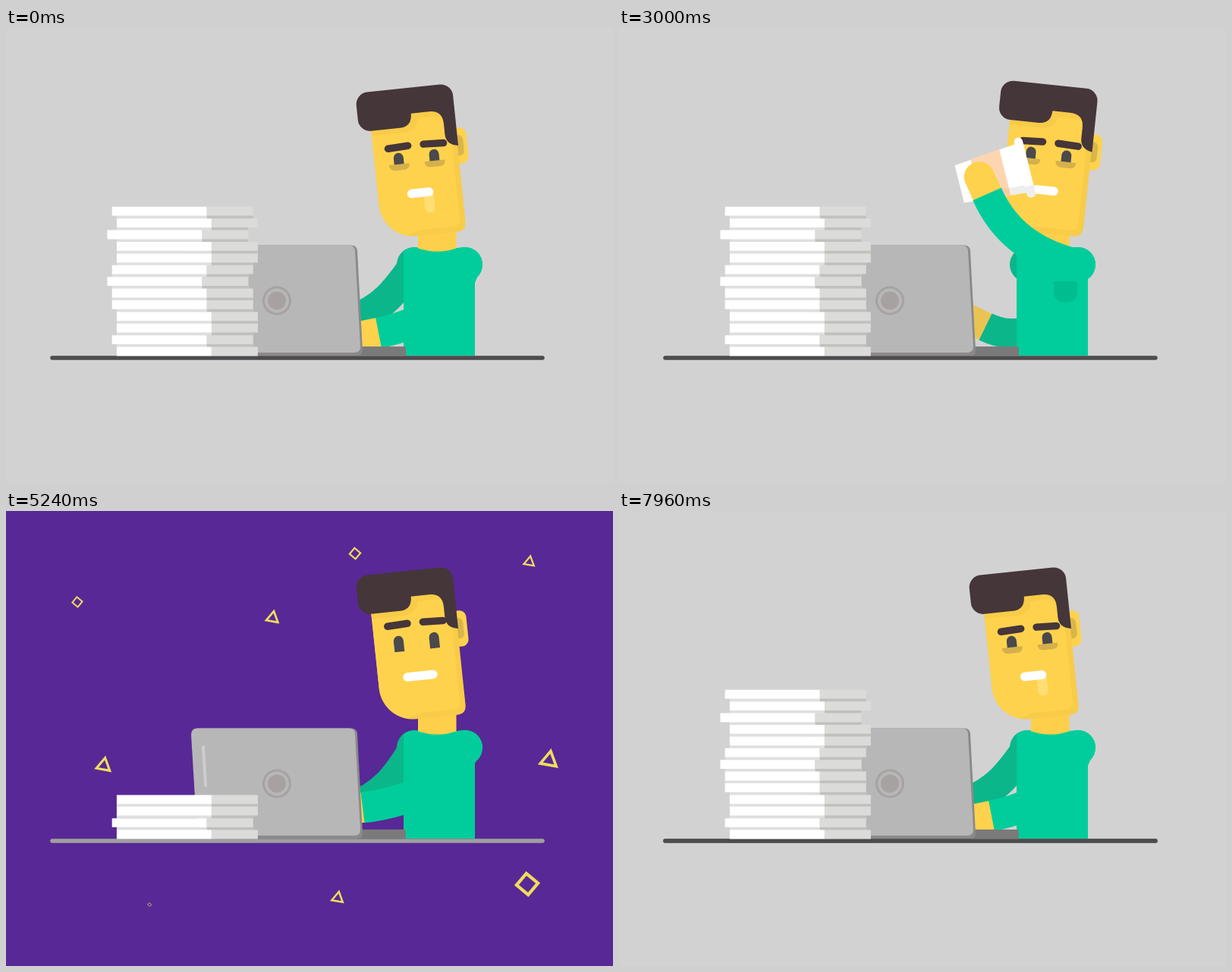
These frames come from a looping animation (800 by 600 pixels, 8 s). An HTML page with a canvas:

```html
<!DOCTYPE html>
<html lang="en">
<head>
<meta charset="utf-8">
<title>Coffee break</title>
<style>
  html, body { margin: 0; width: 100%; height: 100%; overflow: hidden; background: #d2d2d2; }
  canvas { display: block; }
</style>
</head>
<body>
<canvas id="stage" width="800" height="600"></canvas>
<script>
const c = document.getElementById('stage').getContext('2d');
const LOOP = 8000, TAU = Math.PI * 2, DEG = Math.PI / 180;
const GRAY = '#d2d2d2', PURPLE = '#582896', PINK = '#ed2a66', MINT = '#05f2b5';
const SKIN = '#ffd24d', SKIN_SHADE = '#f8cb48', BAG = '#d5b04c', HAIR = '#453639';
const SHIRT = '#00cd9b', SHIRT_SHADE = '#0bb68a';
const BURST = [588, 177], SLAM = [228, 405];

const lerp = (a, b, u) => a + (b - a) * u;
const mix = (a, b, u) => a.map((v, i) => lerp(v, b[i], u));
const clamp = u => Math.max(0, Math.min(1, u));
// Eased rise from 0 to 1 between two times
function ramp(t, from, to) {
  const u = clamp((t - from) / (to - from));
  return u * u * (3 - 2 * u);
}
// Rises at one time and falls again at another
const pulse = (t, on, off, time) => ramp(t, on, on + time) - ramp(t, off, off + time);

function fill(color, d) {
  c.fillStyle = color;
  c.fill(new Path2D(d));
}
function rect(color, x, y, w, h, r = 0) {
  c.fillStyle = color;
  c.beginPath();
  c.roundRect(x, y, w, h, r);
  c.fill();
}
function disc(color, x, y, r) {
  if (r <= 0) return;
  c.fillStyle = color;
  c.beginPath();
  c.arc(x, y, r, 0, TAU);
  c.fill();
}
function line(color, width, x1, y1, x2, y2) {
  c.strokeStyle = color;
  c.lineWidth = width;
  c.lineCap = 'round';
  c.beginPath();
  c.moveTo(x1, y1);
  c.lineTo(x2, y2);
  c.stroke();
}
function placed(x, y, degrees, draw) {
  c.save();
  c.translate(x, y);
  c.rotate(degrees * DEG);
  draw();
  c.restore();
}

// Resting place and size: squares first, then triangles
const SQUARES = 4;
const BITS = [
  [94, 120, 7], [460, 56, 12], [687, 492, 15], [189, 519, 4],
  [716, 329, 13], [351, 141, 15], [128, 336, 11], [690, 67, 13], [437, 511, 9]
];

function confetti(t) {
  const turn = (t - 3920) / 1320;
  BITS.forEach(([x, y, size], i) => {
    const square = i < SQUARES, sides = square ? 4 : 3;
    const age = t - (square ? 3380 : 3540);
    if (age <= 0) return;
    const out = 1 - Math.exp(-age / (square ? 180 : 270));
    const beat = Math.cos(Math.PI * turn) * (i % 2 ? 0.25 : -0.18);
    const r = size * (1 + beat) * clamp(age / 100);
    placed(lerp(BURST[0], x, out), lerp(BURST[1], y, out), 56 * turn - 16, () => {
      c.beginPath();
      for (let k = 0; k < sides; k++) {
        const a = (k + (square ? 0.5 : 0)) / sides * TAU;
        c.lineTo(0.8 * r * Math.cos(a), 0.8 * r * Math.sin(a));
      }
      c.closePath();
      c.lineWidth = r * 0.24;
      c.strokeStyle = '#f0dc5e';
      c.stroke();
    });
  });
}

function table(color, x, y, r) {
  c.save();
  c.beginPath();
  c.arc(x, y, r, 0, TAU);
  c.clip();
  line(color, 5.5, 61, 435, 707, 435);
  c.restore();
}

function backdrop(t) {
  const r = (t - 3286) * 1.5, inner = Math.max(0, r - 56);
  const back = Math.max(0, (t - 6358) * 1.5);
  rect(GRAY, 0, 0, 800, 600);
  disc(MINT, ...BURST, r);
  disc(PINK, ...BURST, r - 29);
  disc(PURPLE, ...BURST, inner);
  confetti(t);
  disc(GRAY, ...SLAM, back);
  table('#4e4b4d', ...BURST, 1000);
  table('#a19fa1', ...BURST, inner);
  table('#4e4b4d', ...SLAM, back);
}

// Sleeve along a curve from shoulder to wrist, with the hand beyond it
function arm(sx, sy, [ax, ay, bx, by, wx, wy], width, sleeve, skin) {
  const k = 25 / Math.hypot(wx - bx, wy - by);
  line(skin, width - 1, wx, wy, wx + (wx - bx) * k, wy + (wy - by) * k);
  c.strokeStyle = sleeve;
  c.lineWidth = width;
  c.lineCap = 'butt';
  c.beginPath();
  c.moveTo(sx, sy);
  c.bezierCurveTo(ax, ay, bx, by, wx, wy);
  c.stroke();
  disc(sleeve, sx, sy, 23);
}

// Front wrist: x, y and the angle of the hand
const TYPE = [491, 402, 169], TYPE_UP = [470, 391, 173], REACH = [444, 384, 170];
const GRAB = [477, 400, 170], DRINK = [485, 219, 246], TOSS = [558, 204, 305];

const typing = t => pulse(t, 4180, 5860, 90) * (0.5 + 0.5 * Math.cos((t - 5240) / 160 * TAU));

function wrist(t) {
  let w = mix(TYPE, REACH, ramp(t, 1620, 1840));
  w = mix(w, GRAB, ramp(t, 1840, 2020));
  w = mix(w, DRINK, ramp(t, 2380, 2860));
  w[0] -= 40 * pulse(t, 2380, 2560, 180);
  w = mix(w, TOSS, ramp(t, 3540, 3740));
  w = mix(w, TYPE, ramp(t, 3960, 4180));
  return mix(w, TYPE_UP, typing(t));
}

function frontArm(t) {
  const [x, y, angle] = wrist(t), drop = y - 212;
  const bend = [x - 66 * Math.cos(angle * DEG), y - 66 * Math.sin(angle * DEG)];
  arm(605, 312, [560 + 0.16 * drop, 300 + 0.32 * drop, ...bend, x, y], 41, SHIRT, SKIN);
}

function backArm(t) {
  const work = [515, 345, 495, 372, 455, 384], rest = [580, 410, 520, 412, 483, 394];
  const pose = mix(work, rest, ramp(t, 2400, 2800) - ramp(t, 3980, 4200));
  const sag = 5 * (typing(t) + pulse(t, 1640, 2400, 360));
  arm(538, 312, pose.map((v, i) => i % 2 ? v + sag : v), 39, SHIRT_SHADE, '#eac452');
}

function body() {
  fill(SHIRT, 'M524 432V295Q532 288 543 290H594L605 289L618 300V432Z');
  disc(SHIRT, 605, 312, 23);
  fill('#00bd8f', 'M573 334h31v13q0 15-15.500 15t-15.500-15Z');
  fill('#fdcf4b', 'M543 255H593.500V290.500Q569 299 543 290.500Z');
}

function eye(x, bag) {
  fill('#4b494b', `M${x - 6.5} 181V166.500a6.500 6.500 0 0 1 13 0V181Z`);
  placed(x, 183, 0, () => {
    c.scale(bag, bag);
    fill(BAG, 'M-13.500-8h27q0 8-8 8h-11q-8 0-8-8Z');
  });
}

function head(t) {
  const upright = pulse(t, 1000, 4000, 300) + pulse(t, 2320, 3440, 180)
    + ramp(t, 6250, 6420) - ramp(t, 6635, 6960);
  const tired = 1 - ramp(t, 3240, 3560) + ramp(t, 6560, 7800);
  const drool = 28 + 15 * ramp(t, 0, 2000) - 43 * ramp(t, 2800, 3000) + 28 * ramp(t, 7250, 7960);
  const brow = 145.5 + 7 * Math.sqrt(tired);

  placed(569, 290, 6 * upright - 6, () => {
    c.translate(-569, -290);
    rect(SKIN, 598, 135, 24, 47.5, 9);
    rect('#d9b64b', 604, 145, 13, 27, 6);
    fill(SKIN_SHADE, 'M498 105H609V259Q609 271.500 597 271.500H543A45 45 0 0 1 498 226.500Z');
    fill(SKIN, 'M498 105H602V254Q602 264 592 264H553Q542 264 532 270A45 45 0 0 1 498 226.500Z');
    fill(SKIN_SHADE, 'M548 110H594V118H560Q558 134 540 134H498V126H538Z');
    fill(SKIN, 'M560 128V122Q561 117 568 117H585Q594 119 594 128Z');
    fill(HAIR, 'M498 76H594A16 16 0 0 1 610 92V158.500Q594 156 594 142V128Q594 110 576 110H552.500Q552 127.500 536 127.500H498A16 16 0 0 1 482 111.500V92A16 16 0 0 1 498 76Z');
    if (t > 3450 && t < 4000) rect('#ffe07d', 557, 160.5, 13, 5.5, 2);
    for (const [x, slope] of [[530, 0.6], [577, -0.6]]) {
      eye(x, tired);
      line(HAIR, 9.5, x - 12.5, brow + slope, x + 14, brow - slope);
    }
    if (drool > 6) rect('#ffde74', 558, 212, 13, drool + 3, [0, 0, 6.5, 6.5]);
    rect('#fff', 531 + 5.5 * tired, 209.5, 45.5 - 11 * tired, 11.5, 5.75);
  });
}

function laptop() {
  rect('#7b7a7a', 463, 420, 64, 12.5, [0, 3, 0, 0]);
  fill('#8b8a8a', 'M252 286.500H455Q462.500 286.500 463 294L470 425Q470 432 463 432H254Z');
  fill('#b7b7b7', 'M252 286.500H452Q459.500 286.500 460 294L467 420Q467 428 459 428H252L244 295Q244 286.500 252 286.500Z');
  line('#cdcdcd', 4, 260, 311, 263, 362);
  disc('#a7a2a1', 357, 359.5, 19);
  disc('#b7b7b7', 357, 359.5, 16);
  disc('#a7a2a1', 357, 359.5, 12);
}

// How far each sheet sticks out, from the top
const SHEETS = [1, 2, 0, 2, 2, 1, 0, 1, 1, 2, 2, 1, 2].map(step => 133.5 + 6.2 * step);

function stack(t) {
  const landing = t > 6000, away = landing ? 1 - ramp(t, 6130, 6356) : 0;
  const gone = landing ? 0 : Math.max(0, Math.floor((t - 4120) / 124));
  placed(-345 * away, -110 * away, 0, () => {
    for (let i = gone; i < SHEETS.length; i++) {
      const x = SHEETS[i], next = SHEETS[i + 1], y = 235.8 + i * 15.4;
      if (next) {
        const left = Math.max(x, next), right = Math.min(x, next) + 186;
        rect('#dfdfdf', left, y + 11, right - left, 4.8);
        rect('#c1c0bd', x + 125, y + 11, right - x - 125, 4.8);
      }
      rect('#fff', x, y, 125, 11.8);
      rect('#dbdbd9', x + 125, y, 61, 11.8);
    }
  });
}

// Flies in from the left, rides in the hand, then is thrown away
function cup(t) {
  if (t < 740 || t > 3900) return;
  const [x, y, angle] = t < 2380 ? GRAB : wrist(t);
  const fly = clamp((t - 740) / 560), thrown = clamp((t - 3580) / 240);
  const left = -515 * (1 - fly), rise = 90 * (1 - fly * fly) + 180 * fly * (1 - fly);
  placed(x + left + 280 * thrown, y - rise - 340 * thrown, angle - GRAB[2] + 120 * thrown, () => {
    c.translate(-GRAB[0], -GRAB[1]);
    fill('#fff', 'M422 347H488L481 432H430Z');
    fill('#eeeeee', 'M478 347H488L486 370H476Z');
    fill('#fdd6b1', 'M423.800 370H486.200L482.800 410H427.600Z');
    fill('#f8cda6', 'M476 370H486.200L482.800 410H474Z');
    rect('#fff', 414.5, 337.5, 81, 11.5, 5.5);
    rect('#eeeeee', 480, 337.5, 15.5, 11.5, [0, 5.5, 5.5, 0]);
  });
}

function draw(t) {
  const drinking = t > 1620 && t < 4060;
  backdrop(t);
  backArm(t);
  body();
  head(t);
  if (!drinking) frontArm(t);
  laptop();
  stack(t);
  cup(t);
  if (drinking) frontArm(t);
}

const start = performance.now();
function tick() {
  draw((performance.now() - start) % LOOP);
  requestAnimationFrame(tick);
}
tick();
</script>
</body>
</html>
```
